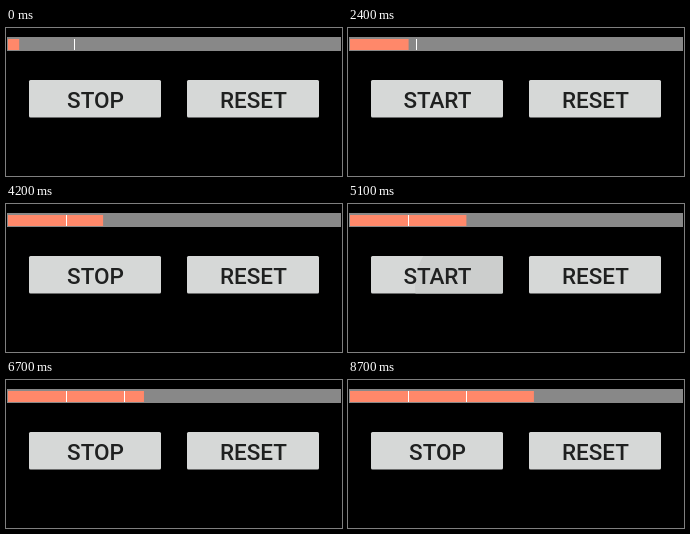
An HTML page for the animation above (8.8 s loop, 336 by 148 pixels).

```html
<!DOCTYPE html>
<html lang="en">
<head>
<meta charset="utf-8">
<title>Recording progress</title>
<style>
  html, body { margin: 0; width: 100%; height: 100%; overflow: hidden; background: #000; }
  svg { display: block; width: 336px; height: 148px; }
  text {
    font: 500 22.5px Roboto, sans-serif;
    text-anchor: middle;
    fill: #1f2020;
  }
  .button { fill: #d6d8d7; }
  .fill, .stop, .start, .cut, .ripple {
    animation: 8800ms step-end -4ms infinite;
  }

  /* The bar grows in 100 ms ticks and rests while paused. */
  .fill { fill: #ff886a; animation-name: grow; }
  @keyframes grow {
    0%       { width: 11.2px; animation-timing-function: steps(20); }
    22.7273% { width: 58.6px; }
    30.6818% { width: 59.6px; animation-timing-function: steps(24); }
    57.9545% { width: 116.4px; }
    67.0455% { width: 116.8px; animation-timing-function: steps(29); }
    100%     { width: 186.3px; }
  }

  .stop { animation-name: running; }
  @keyframes running {
    0%, 30.6818%, 67.0455%, 100% { visibility: visible; }
    22.7273%, 57.9545%           { visibility: hidden; }
  }

  .start { animation-name: paused; }
  @keyframes paused {
    0%, 30.6818%, 67.0455%, 100% { visibility: hidden; }
    22.7273%, 57.9545%           { visibility: visible; }
  }

  .mark { fill: #fff; }
  .first { animation-name: first; }
  @keyframes first {
    0%             { visibility: hidden; }
    30.6818%, 100% { visibility: visible; }
  }
  .second { animation-name: second; }
  @keyframes second {
    0%             { visibility: hidden; }
    67.0455%, 100% { visibility: visible; }
  }

  .ripple { fill: #cccecd; animation-name: ripple; }
  @keyframes ripple {
    0%, 62.5%, 100% { visibility: hidden; }
    57.9545%        { visibility: visible; }
  }
</style>
</head>
<body>
<svg viewBox="0 0 336 148">
  <clipPath id="face"><rect x="23" y="52" width="132" height="37.5" rx="1.5"/></clipPath>

  <rect x="1" y="9" width="334" height="14" fill="#888"/>
  <rect class="mark" x="68" y="11" width="1" height="11"/>
  <rect class="fill" x="2" y="11" width="11.2" height="11"/>
  <rect class="mark cut first" x="60" y="11" width="1" height="11"/>
  <rect class="mark cut second" x="118" y="11" width="1" height="11"/>

  <rect class="button" x="23" y="52" width="132" height="37.5" rx="1.5"/>
  <circle class="ripple" cx="125" cy="82" r="58" clip-path="url(#face)"/>
  <text class="stop" x="89.5" y="79.5">STOP</text>
  <text class="start" x="89.5" y="79.5">START</text>

  <rect class="button" x="181" y="52" width="132" height="37.5" rx="1.5"/>
  <text x="247.5" y="79.5">RESET</text>
</svg>
</body>
</html>
```
